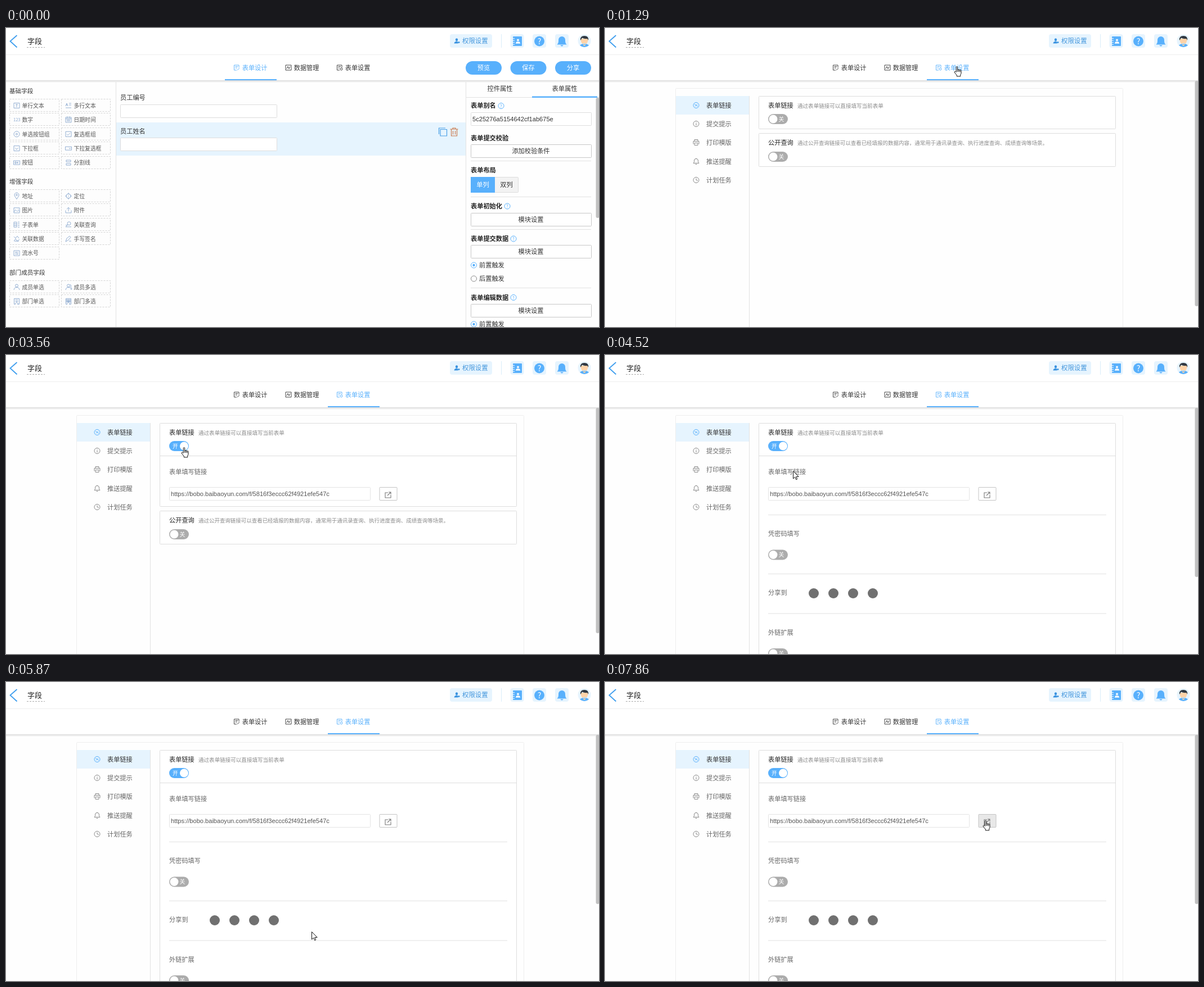
These frames come from a looping animation (1054x532 px, 8 s). An HTML page:

```html
<!DOCTYPE html>
<html lang="zh-CN">
<head>
<meta charset="utf-8">
<title>表单设置</title>
<style>
html, body { margin: 0; width: 100%; height: 100%; overflow: hidden; background: #fefefe; }
svg { display: block; }
text { font-family: 'Noto Sans CJK SC', 'Noto Sans CJK', 'Noto Sans', sans-serif; white-space: pre; }
text.latin { font-family: 'Liberation Sans', Arial, sans-serif; }
</style>
</head>
<body>
<svg id="stage" width="1054" height="532" viewBox="0 0 1054 532"></svg>
<script>
const BLUE = '#58b0fc', PALE = '#e6f4fe', INK = '#333', GREY = '#666';

// Drawing helpers: each returns SVG markup. Text is placed by its vertical centre.
const text = (x, cy, s, size = 11.2, fill = INK, extra = '') =>
  `<text x="${x}" y="${cy + size * .38}" font-size="${size}" fill="${fill}" ${extra}>${s}</text>`;
const bold = (x, cy, s) => text(x, cy, s, 11.2, '#222', 'font-weight="700"');
const centred = (x, cy, s, size, fill) => text(x, cy, s, size, fill, 'text-anchor="middle"');
const rect = (x, y, w, h, fill, r = 0, extra = '') =>
  `<rect x="${x}" y="${y}" width="${w}" height="${h}" rx="${r}" fill="${fill}" ${extra}/>`;
const box = (x, y, w, h, stroke = '#ddd', fill = '#fff', r = 1, extra = '') =>
  rect(x + .5, y + .5, w, h, fill, r, `stroke="${stroke}" ${extra}`);
const hline = (x1, x2, y, color = '#e2e2e2') => rect(x1, y, x2 - x1, 1, color);
const vline = (x, y1, y2, color = '#e2e2e2') => rect(x, y1, 1, y2 - y1, color);
const circle = (x, y, r, fill, extra = '') => `<circle cx="${x}" cy="${y}" r="${r}" fill="${fill}" ${extra}/>`;
const icon = (x, y, d, color, width = 1, fill = 'none') =>
  `<path transform="translate(${x} ${y})" d="${d}" fill="${fill}" stroke="${color}" stroke-width="${width}"/>`;
const solid = (x, y, d, color) => icon(x, y, d, color, 0, color);
const group = (id, content) => `<g id="${id}">${content}</g>`;
const scrollbar = (y1, y2) => rect(1048.5, y1, 6, y2 - y1, '#c1c1c1', 3);
const help = (x, y) => circle(x, y, 5, '#fff', `stroke="${BLUE}"`) + centred(x, y, '?', 8, BLUE);

// Icon outlines, centred on 0,0
const FRAME = 'M-5-4.5H5V4.5H-5Z';
const RING = 'M-5 0A5 5 0 1 1 5 0A5 5 0 1 1-5 0';
const BELL = 'M-5 3H5L3.5 1V-1.5A3.5 3.5 0 0 0-3.5-1.5V1ZM-1.5 5H1.5M0-5V-6';
const PERSON = 'M-2.5-2.5A2.5 2.5 0 1 1 2.5-2.5A2.5 2.5 0 1 1-2.5-2.5M-5 5Q-4 0 0 .5Q4 0 5 5';
const ORG = 'M-4.5-5H4.5V5H1M-4.5-5V5H-2M-2.5-2.5H2.5M-2.5 0H2.5M-3 5L0 1L3 5';

const fieldGroups = [
  ['基础字段', 112, [
    ['单行文本', FRAME + 'M-2-2H2M0-2V3'], ['多行文本', 'M-5 1L-3-4L-1 1M-4-1H-2M1-4H5M1-1H5M-5 4H5'],
    ['数字', ''], ['日期时间', FRAME + 'M-5-2H5M-3 0H3M-3 2H3M-2-6V-3M2-6V-3'],
    ['单选按钮组', RING + 'M-1.5 0A1.5 1.5 0 1 1 1.5 0A1.5 1.5 0 1 1-1.5 0'], ['复选框组', FRAME + 'M-3 0L-1 2L3-2'],
    ['下拉框', FRAME + 'M-2.5-1L0 2L2.5-1'], ['下拉复选框', 'M-5.5-3H5.5V3H-5.5ZM1-1L2.5 1L4-1'],
    ['按钮', 'M-5.5-3.5H5.5V3.5H-5.5ZM-3-1.5V1.5H-1V-1.5ZM1-1.5V1.5M3-1.5L1 0L3 1.5'], ['分割线', 'M-4-4.5H4V-1.5H-4ZM-4 1.5H4V4.5H-4Z']]],
  ['增强字段', 273, [
    ['地址', 'M0 5.5L-3.5 0A4 4 0 1 1 3.5 0ZM-1.3-2A1.3 1.3 0 1 1 1.3-2A1.3 1.3 0 1 1-1.3-2'], ['定位', 'M-4 0A4 4 0 1 1 4 0A4 4 0 1 1-4 0M0-6V-3M0 3V6M-6 0H-3M3 0H6M-1 0H1'],
    ['图片', FRAME + 'M-5 3L-2-1L1 2L3 0L5 2M2-2H3'], ['附件', 'M-5 0V4.5H5V0M0 2V-5M-3-2L0-5L3-2'],
    ['子表单', 'M-5-4.5H0V4.5H-5ZM-5-1.5H0M-5 1.5H0M2-4.5H5M2-1.5H5M2 1.5H5M2 4.5H5'], ['关联查询', 'M-2-2A3 3 0 1 1 4-2A3 3 0 1 1-2-2M-1 0L-5 4H5M-5 1H-2'],
    ['关联数据', 'M-5-4L-2-1L1-5L4-1M-5 4L-2 0L1 4L5 1M-4 4H4'], ['手写签名', 'M-5 5L-3-1L2-5L4-3L0 2L-5 5M1 4H5'],
    ['流水号', FRAME + 'M-3-1.5H3M-3 1.5H3M-1-2.5V-.5M1 .5V2.5']]],
  ['部门成员字段', 435, [
    ['成员单选', PERSON], ['成员多选', PERSON + 'M3-5Q6-3 4 0Q6 1 6 4'],
    ['部门单选', ORG], ['部门多选', ORG + 'M-5-3H4M-5-1H4M-5 1H4']]],
];

const tabItems = [
  ['表单设计', 410, 'M-4.5-4.5H4V0M-4.5-4.5V4.5H0M-2.5-2H2M-2.5 .5H1M1 4.5L5 1'],
  ['数据管理', 502, FRAME + 'M-3 2L-1-2L1 2L3-2'],
  ['表单设置', 593, 'M-4.5-4.5H4V0M-4.5-4.5V4.5H0M-2.5-2H2M-2.5 .5H0M1 2.5A2 2 0 1 1 5 2.5A2 2 0 1 1 1 2.5'],
];
const tabs = active => tabItems.map(([label, x, d], i) => {
  const on = i === active;
  return icon(x, 70.5, d, on ? BLUE : INK, .9) + text(x + 9.7, 71, label, 11.2, on ? BLUE : INK)
    + (on ? rect(x - 21, 91, 92, 2, BLUE) : '');
}).join('');

function header() {
  return rect(0, 0, 1054, 93, '#fff') + hline(0, 1054, 47, '#ededed')
    + [.12, .09, .06, .03].map((a, i) => hline(0, 1054, 93 + i, `rgba(0,0,0,${a})`)).join('')
    + icon(13, 24, 'M6.5-11L-5.5-.5L6.5 10.5', '#3f9eee', 1.8)
    + text(38, 23, '字段', 13, '#222')
    + '<path d="M37 34.5H69" stroke="#aaa" stroke-dasharray="3 2"/>'
    + rect(789, 11, 75, 24, PALE, 4)
    + solid(801, 23, 'M-2.2-2.2A2.2 2.6 0 1 1 2.2-2.2A2.2 2.6 0 1 1-2.2-2.2M-4.5 4.5Q-4 .8 0 .8Q2 .8 2.6 2V4.5Z', '#3a93e0')
    + circle(805, 25.5, 1.5, '#3a93e0')
    + text(811, 23, '权限设置', 11.4, '#4095dc') + vline(880, 11, 35, '#d8ecfa')
    + [896.5, 936, 976].map(x => rect(x, 11, 24, 24, PALE, 4)).join('')
    + rect(901, 15, 16, 17, BLUE, 1) + icon(902, 23.5, 'M-2-5H2M-2-1.5H2M-2 2H2M-2 5.5H2', '#fff', 1)
    + icon(910, 23.5, 'M-1.8-2A1.8 1.8 0 1 1 1.8-2A1.8 1.8 0 1 1-1.8-2M-4 4Q-3 0 0 1Q3 0 4 4Z', '#fff', .3, '#fff')
    + circle(948, 23.5, 9, BLUE) + centred(948, 23.5, '?', 14, '#fff')
    + solid(988, 23.5, 'M-8.5 6Q-6 4-6 0V-2.5A6 6 0 0 1 6-2.5V0Q6 4 8.5 6ZM-2.5 7H2.5Q2 9 0 9Q-2 9-2.5 7Z', BLUE)
    + circle(1028, 23, 11.5, PALE)
    + solid(1028, 23, 'M-8 8Q-6 5 0 5Q6 5 8 8Q0 14-8 8Z', BLUE)
    + solid(1028, 23, 'M-6.5-4Q-7 5 0 6.5Q7 5 6.5-4ZM-2 4H2V7.5L0 9L-2 7.5Z', '#ffd3a8')
    + solid(1028, 23, 'M-7-1Q-8-9 0-9Q8-9 7-1L5.5-4Q0-3-4-5.5L-5.5-3Z', '#303840');
}

function fieldList() {
  return fieldGroups.map(([title, cy, items]) => text(6, cy, title, 10.6, INK)
    + items.map(([label, d], i) => {
      const x = i % 2 ? 98 : 6, y = cy + 26 + 25.4 * (i >> 1);
      return box(x, Math.round(y - 12), i % 2 ? 87 : 88, 22, '#d4d4d4', '#fdfdfd', 0, 'stroke-dasharray="3 2"')
        + (d ? icon(x + 13, y, d, '#8aa8cf', .9) : text(x + 7, y, '123', 7.5, '#8aa8cf'))
        + text(x + 22.5, y, label, 9.8, '#555');
    }).join('')).join('') + vline(195, 96, 532);
}

function propertyPanel() {
  const button = (y, label) => box(826, y, 214, 23, '#c8c8c8') + centred(933, y + 12, label);
  const radio = (cy, label, on) => circle(831.5, cy, 5, '#fff', `stroke="${on ? BLUE : '#888'}"`)
    + (on ? circle(831.5, cy, 2.2, BLUE) : '') + text(841, cy, label);
  return vline(817, 96, 532) + centred(878, 108, '控件属性') + centred(993, 108, '表单属性')
    + hline(818, 1054, 123) + rect(935, 121.5, 116, 2.5, BLUE)
    + bold(826, 138, '表单别名') + help(880, 138.5) + box(826, 150, 214, 23)
    + text(829, 162, '5c25276a5154642cf1ab675e', 11.1, INK, 'class="latin"')
    + bold(826, 196, '表单提交校验') + button(207, '添加校验条件') + hline(826, 1040, 236)
    + bold(826, 253, '表单布局') + box(868, 265, 42, 27, '#ddd', '#f3f3f3') + rect(826, 265, 43, 28, BLUE)
    + centred(847.5, 279, '单列', 11.2, '#fff') + centred(889.5, 279, '双列') + hline(826, 1040, 300)
    + bold(826, 317, '表单初始化') + help(891, 317) + button(329, '模块设置') + hline(826, 1040, 358)
    + bold(826, 375, '表单提交数据') + help(902, 375) + button(386, '模块设置')
    + radio(422, '前置触发', true) + radio(446, '后置触发', false) + hline(826, 1040, 462)
    + bold(826, 480, '表单编辑数据') + help(902, 479.5) + button(491, '模块设置') + radio(527, '前置触发', true)
    + scrollbar(124, 338);
}

function designPage() {
  return tabs(0)
    + ['预览', '保存', '分享'].map((s, i) => rect(817 + 79.5 * i, 59, 64, 24, BLUE, 12) + centred(849 + 79.5 * i, 71, s, 11.2, '#fff')).join('')
    + fieldList()
    + text(203, 124, '员工编号') + box(203, 136, 278, 23)
    + rect(196, 168, 621, 59, PALE) + text(203, 183.5, '员工姓名') + box(203, 195, 278, 23)
    + icon(776.5, 185, 'M-4.5-4.5H7V7H-4.5ZM-7 4V-7H4.5', '#4a9fe6', 1.2)
    + icon(796.5, 185, 'M-7-5H7M-2.5-5V-7H2.5V-5M-5-5V7H5V-5M-2-2V4.5M2-2V4.5', '#c9794c', 1.2)
    + propertyPanel();
}

const toggle = (cy, id = '') => {
  const tag = name => id ? `id="${id}${name}"` : '';
  return rect(290, cy - 9, 35, 18, '#acacac', 9, tag('Track')) + circle(299, cy, 7.5, '#fff', tag('Knob'))
    + text(308.5, cy, '关', 9.8, '#fff', tag('Label'));
};

const menuItems = [
  ['表单链接', RING + 'M-3-2L3 2M-2 2L2-2'], ['提交提示', RING + 'M0-3V-2M0-1V3'],
  ['打印模版', 'M-3-2V-5H3V-2M-5 3V-2H5V3M-3 1H3V5H-3Z'], ['推送提醒', BELL], ['计划任务', RING + 'M0-3V0L3 1'],
];

function settingsPage() {
  const menu = menuItems.map(([label, d], i) => {
    const cy = Math.round(137.5 + 33.4 * i);
    return icon(162, cy - .5, d, i ? '#888' : BLUE) + text(180, cy, label, 11.2, i ? GREY : INK);
  }).join('');
  const shareDots = [371, 406, 441, 476].map(x => circle(x, 424, 9, '#707070')).join('');
  return tabs(2) + box(125, 107, 795, 500, '#eee', '#fefefe')
    + rect(126, 121, 130, 33, PALE) + vline(256, 121, 532) + menu
    + '<rect id="linkPanel" x="273.5" y="121.5" width="634" rx="1" fill="#fff" stroke="#ddd"/>'
    + text(290, 138, '表单链接', 11.2, '#222') + text(342, 138, '通过表单链接可以直接填写当前表单', 9.55, '#8a8a8a')
    + toggle(162, 'link')
    + group('linkRow', hline(274, 908, 179, '#ddd') + text(290, 208, '表单填写链接', 11.2, GREY)
      + box(290, 235, 357, 23, '#e4e4e4')
      + text(293, 247, 'https://bobo.baibaoyun.com/f/5816f3eccc62f4921efe547c', 11.1, '#555', 'class="latin"')
      + '<rect id="openButton" x="664" y="235.5" width="31" height="23" rx="1" stroke="#c4c4c4"/>'
      + icon(679, 249, 'M0-4H-5V5H5V0M1-5H5V-1M5-5L-1 1', '#777', 1.1))
    + group('publicPanel', box(273, 187, 634, 59) + text(290, 204, '公开查询', 11.2, '#222')
      + text(342, 204.5, '通过公开查询链接可以查看已经填报的数据内容，通常用于通讯录查询、执行进度查询、成绩查询等场景。', 9.47, '#8a8a8a')
      + toggle(229))
    + group('moreOptions', [284, 389, 459.5].map(y => hline(290, 891, y)).join('')
      + text(290, 318, '凭密码填写', 11.2, GREY) + toggle(355.5)
      + text(290, 423, '分享到', 11.2, GREY) + shareDots
      + text(290, 494, '外链扩展', 11.2, GREY) + toggle(531))
    + group('longBar', scrollbar(94, 495)) + group('shortBar', scrollbar(94, 395));
}

const HAND = 'M-1.2 9V1.3A1.2 1.2 0 0 1 1.2 1.3V6.2A1.1 1.1 0 0 1 3.4 6.5A1.1 1.1 0 0 1 5.6 7A1 1 0 0 1 7.6 7.8V12L6.2 15V17.5H-.2V15.5L-4.3 10.5Q-4.6 8.6-3 8.4L-1.2 10ZM1.2 6.2V9.5M3.4 6.5V9.5M5.6 7V10';
const ARROW = 'M0 0V13.5L3.2 10.6L5.2 15.2L7.2 14.3L5.3 9.9H9.6Z';

const stage = document.getElementById('stage');
stage.innerHTML = header() + group('design', designPage()) + group('settings', settingsPage())
  + '<path id="cursor" fill="#fff" stroke="#111" stroke-linejoin="round"/>';
const el = id => document.getElementById(id);
const show = (id, on) => el(id).setAttribute('display', on ? 'inline' : 'none');
const set = (id, attrs) => { for (const k in attrs) el(id).setAttribute(k, attrs[k]); };

const LOOP = 8000, OPEN_PAGE = 1290, SWITCH_ON = 3240, LINK_READY = 3560, ALL_READY = 3660;
// Pointer moves: first and last step time, number of steps, destination
const moves = [
  [310, 870, 8, 648, 92], [1030, 1110, 2, 625, 68], [1500, 2530, 14, 235, 139],
  [2610, 2840, 4, 313, 166], [3080, 3080, 1, 316, 164], [4360, 5240, 12, 429, 434],
  [5320, 6110, 11, 592, 448], [6740, 7860, 15, 676, 246],
];
const smooth = p => p * p * (3 - 2 * p);

function pointerAt(t) {
  let x = 1040, y = 420;
  for (const [start, end, steps, toX, toY] of moves) {
    if (t < start) break;
    const done = end > start ? Math.floor((t - start) / (end - start) * (steps - 1) + .001) + 1 : 1;
    const p = smooth(Math.min(1, done / steps));
    x += (toX - x) * p;
    y += (toY - y) * p;
  }
  return [Math.round(x), Math.round(y)];
}

function render(t) {
  const opened = t >= OPEN_PAGE, linked = t >= LINK_READY, full = t >= ALL_READY;
  show('design', !opened);
  show('settings', opened);
  show('linkRow', linked);
  show('moreOptions', full);
  show('publicPanel', !full);
  show('longBar', !full);
  show('shortBar', full);
  set('publicPanel', { transform: `translate(0 ${linked ? 90 : 0})` });
  set('linkPanel', { height: full ? 500 : linked ? 148 : 58 });

  const on = t >= SWITCH_ON, slide = Math.min(1, Math.max(0, (t - SWITCH_ON + 80) / 240));
  set('linkTrack', { fill: on ? BLUE : '#acacac' });
  set('linkKnob', { cx: 299 + (on ? 17.5 * smooth(slide) : 0) });
  set('linkLabel', { x: on ? 296 : 308.5 });
  el('linkLabel').textContent = on ? '开' : '关';

  const [x, y] = pointerAt(t);
  const over = (x1, y1, x2, y2) => x >= x1 && x <= x2 && y >= y1 && y <= y2;
  const overOpen = linked && over(664, 235, 695, 259);
  set('openButton', { fill: overOpen ? '#e8e8e8' : '#fff' });
  const hand = over(389, 48, 664, 92) || overOpen
    || opened && (over(126, 121, 256, 288) || over(290, 153, 325, 171))
    || full && over(360, 412, 522, 438);
  set('cursor', { d: hand ? HAND : ARROW, transform: `translate(${x + .5} ${y + .5})` });
  show('cursor', t >= 310);
}

function tick() {
  render(performance.now() % LOOP);
  requestAnimationFrame(tick);
}
tick();
</script>
</body>
</html>
```
